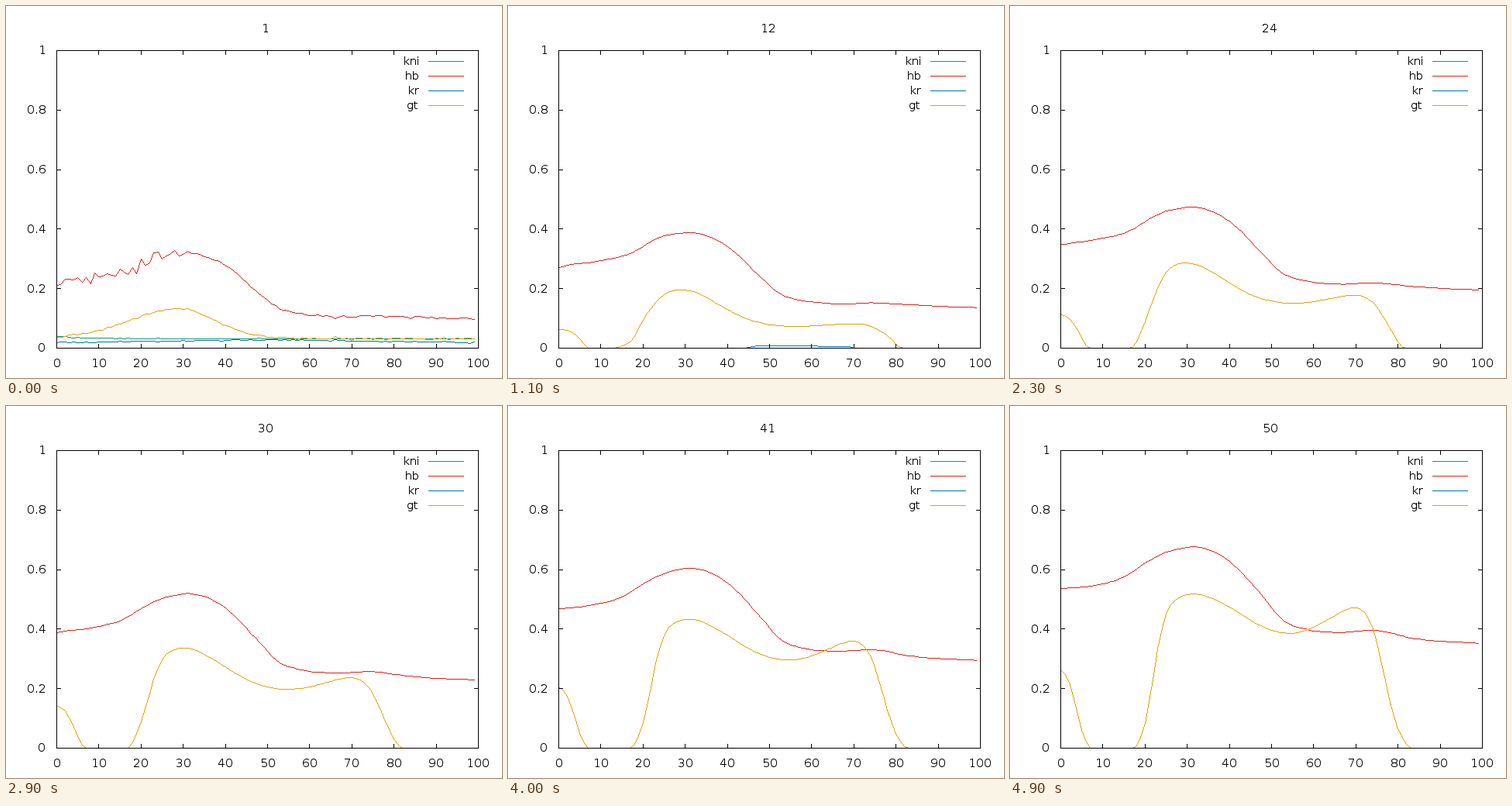
Write a matplotlib script that moves like this. It is 640 px wide and 480 px high and loops after 5000 ms.

```python
import numpy as np
import matplotlib.pyplot as plt
from matplotlib.animation import FuncAnimation
from matplotlib.collections import PolyCollection

W, H, DPI = 640, 480, 100
FRAMES, INTERVAL = 50, 100
LEFT, RIGHT, TOP, BOTTOM = 65, 609, 57, 441
COLORS = {"kni": "#009e73", "hb": "#e51e10", "kr": "#0072b2", "gt": "#e69f00"}
X = np.arange(100)
SQUARE = np.array([[0.1, 0.1], [0.9, 0.1], [0.9, 0.9], [0.1, 0.9]])
rng = np.random.default_rng(4)


def px(x):
    return LEFT + (RIGHT - LEFT) * x / 100


def py(v):
    return BOTTOM - (BOTTOM - TOP) * v


# Profiles along the axis

def step(center, width):
    """Soft step in X: rises for a positive width, falls for a negative one."""
    return 1 / (1 + np.exp(-(X - center) / width))


def bell(center, width):
    return np.exp(-((X - center) / width) ** 2 / 2)


def smooth_curve(nodes, values):
    """Cubic Hermite curve through a few key points."""
    nodes, values = np.array(nodes, float), np.array(values, float)
    slope = np.gradient(values, nodes)
    i = np.clip(np.searchsorted(nodes, X, side="right") - 1, 0, len(nodes) - 2)
    h = nodes[i + 1] - nodes[i]
    t = (X - nodes[i]) / h
    return ((1 + 2 * t) * (1 - t) ** 2 * values[i]
            + t * (1 - t) ** 2 * h * slope[i]
            + t * t * (3 - 2 * t) * values[i + 1]
            + t * t * (t - 1) * h * slope[i + 1])


def diffuse(v, steps, rate=0.2):
    for _ in range(steps):
        p = np.pad(v, 1, mode="edge")
        v = v + rate * (p[:-2] - 2 * v + p[2:])
    return v


def grow(start, end, n, power):
    return start + (end - start) * ((n - 1) / (FRAMES - 1)) ** power


hb_nodes = [0, 8, 15, 21, 27, 32, 37, 42, 47, 53, 58, 65, 75, 84, 99]
hb_start = smooth_curve(hb_nodes, [0.213, 0.234, 0.250, 0.282, 0.305, 0.317, 0.301, 0.258,
                                   0.195, 0.133, 0.116, 0.106, 0.107, 0.105, 0.097])
hb_end = smooth_curve(hb_nodes, [0.532, 0.543, 0.573, 0.625, 0.658, 0.672, 0.655, 0.603,
                                 0.525, 0.427, 0.400, 0.389, 0.394, 0.368, 0.352])

gt_start = 0.033 + 0.1 * bell(29, np.where(X < 29, 11.7, 8.5))
gt_plateau = 0.472 + 0.066 * np.cos(2 * np.pi * (X - 31) / 46)
gt_end = 0.295 * step(3.8, -1.2) + gt_plateau * step(21.8, 1.4) * step(76.7, -2) - 0.02
gt_gaps = 0.09 * step(6, 1) * step(18.8, -0.7) + 0.05 * step(79.5, 0.8)

kni_start = 0.0325 - 0.00002 * X + 0.0075 * np.exp(-X / 5)
kni_decay = 0.0052 - 0.0018 * step(84, 3)
kr_start = 0.0175 + 0.0095 * bell(50, 25)
kr_decay = 0.0045 - 0.0027 * step(43, 1) * step(71, -0.5)

LEVELS = {
    "kni": lambda n: kni_start - kni_decay * (n - 1),
    "hb": lambda n: grow(hb_start, hb_end, n, 1.33 - 0.7 * hb_start),
    "kr": lambda n: kr_start - kr_decay * (n - 1),
    "gt": lambda n: grow(gt_start - gt_gaps * min((n - 1) / 14, 1), gt_end, n,
                         1.55 - 2.6 * gt_start),
}
ROUGHNESS = {
    "kni": 0.0005,
    "hb": 0.002 + 0.011 * step(31, -1),
    "kr": 0.001,
    "gt": 0.002,
}
NOISE = {name: size * rng.normal(size=len(X)) for name, size in ROUGHNESS.items()}


def level(name, n):
    return np.maximum(LEVELS[name](n) + diffuse(NOISE[name], n - 1), 0)


# Drawing with hard one-pixel lines

plt.rcParams.update({"font.family": "DejaVu Sans", "text.hinting": "native",
                     "text.hinting_factor": 1})
fig = plt.figure(figsize=(W / DPI, H / DPI), dpi=DPI, facecolor="white")
ax = fig.add_axes([0, 0, 1, 1])
ax.set_xlim(0, W)
ax.set_ylim(H, 0)
ax.axis("off")


def pixels(xs, ys):
    """Unit squares along a polyline, one for each step of its longer direction."""
    points = np.floor(np.column_stack([xs, ys]) + 0.5)
    parts = []
    for a, b in zip(points[:-1], points[1:]):
        count = max(int(np.abs(b - a).max()), 1)
        t = np.arange(count + 1)[:, None] / count
        parts.append(np.floor(a + (b - a) * t + 0.5))
    return np.concatenate(parts)[:, None] + SQUARE


def line(xs, ys, color="black", z=5):
    squares = PolyCollection(pixels(xs, ys), facecolors=color, edgecolors="none",
                             linewidths=0, antialiaseds=False, zorder=z)
    return ax.add_collection(squares, autolim=False)


def label(x, baseline, text, align="center"):
    return ax.text(x, baseline, text, ha=align, va="baseline",
                   fontsize=11 * 96 / DPI, color="black")


line([LEFT, RIGHT, RIGHT, LEFT, LEFT], [TOP, TOP, BOTTOM, BOTTOM, TOP])
for tick in range(0, 101, 10):
    x = px(tick)
    line([x, x], [BOTTOM, BOTTOM - 5])
    line([x, x], [TOP, TOP + 5])
    label(x + 0.5, 465.5, str(tick))
for k in range(6):
    y = py(k / 5)
    line([LEFT, LEFT + 5], [y, y])
    line([RIGHT, RIGHT - 5], [y, y])
    label(51.5, y + 5.5, f"{k / 5:g}", "right")

curves = {}
for row, (name, color) in enumerate(COLORS.items()):
    y = 71 + 19 * row
    label(532.5, y + 5, name, "right")
    line([545, 590], [y, y], color)
    curves[name] = line([LEFT, RIGHT], [BOTTOM, BOTTOM], color, z=2 + row / 10)
title = label(335.5, 33.5, "")


def update(frame):
    n = frame + 1
    title.set_text(str(n))
    for name, curve in curves.items():
        curve.set_verts(pixels(px(X), py(level(name, n))))
    return [title, *curves.values()]


anim = FuncAnimation(fig, update, frames=FRAMES, interval=INTERVAL,
                     repeat=True, repeat_delay=0, blit=False)
plt.show()
```
